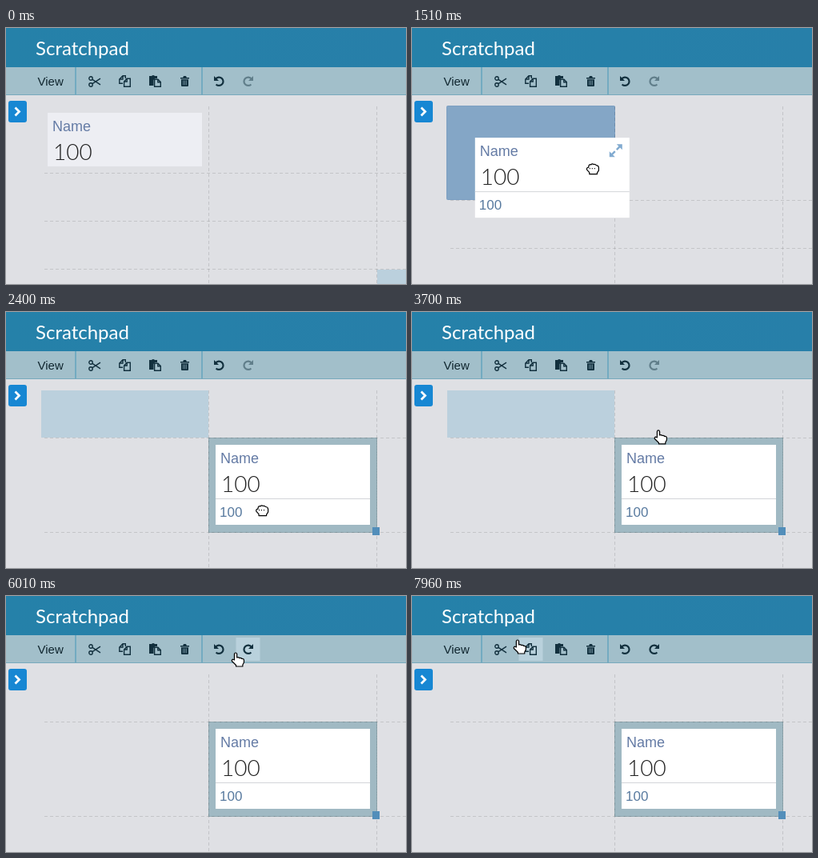
These frames come from a looping animation (500 px wide and 320 px high, 8 s). An HTML page:

```html
<!DOCTYPE html>
<html lang="en">
<head>
<meta charset="utf-8">
<title>Scratchpad</title>
<style>
html, body { margin: 0; width: 100%; height: 100%; overflow: hidden; background: #dfe0e4; }
svg { display: block; width: 500px; height: 320px; }
text { font-family: "Liberation Sans", Arial, sans-serif; }
.lato { font-family: Lato, sans-serif; }
.line { stroke: #000; stroke-opacity: .12; stroke-dasharray: 4 3; fill: none; }
.icon { fill: #12303e; stroke: none; }
.icon .o { fill: none; stroke: #12303e; stroke-width: 1.4; }
.icon .arc { fill: none; stroke: #12303e; stroke-width: 2.2; }
.cur { fill: #fff; stroke: #000; stroke-width: 1.2; stroke-linejoin: round; }
</style>
</head>
<body>
<svg viewBox="0 0 500 320">
  <defs>
    <linearGradient id="head"><stop stop-color="#2581a9"/><stop offset="1" stop-color="#277fa9"/></linearGradient>
    <g id="expand" fill="#82abd0" stroke="#82abd0">
      <path stroke="none" d="M9 0H16V7L13.5 4.5 11.5 2.5ZM0 9V16H7L4.5 13.5 2.5 11.5Z"/>
      <path stroke-width="2.4" d="M9 7 14 2M7 9 2 14"/>
    </g>
    <path id="hand" class="cur" d="M-1.6 9V1.5Q-1.4 0 0 0 1.4 0 1.6 1.5V6Q3.8 5 4.6 6.6 6.8 5.8 7.6 7.4 10 7 10.4 8.8V12L8.8 15V17H.5V15.5L-4.6 10.5Q-5.2 8.6-3.4 8.2Z"/>
    <g id="fist" class="cur">
      <path d="M-5-3Q-4.6-6-2-5.3-.6-7 1.4-5.6 3.4-6.4 4.4-4.6 7.4-4.6 7.6-1.6V2L5.6 5V6.5H-4V4.5L-7.2 1Q-8-1.6-5-2Z"/>
      <path fill="none" stroke-dasharray="1 2" d="M-4-.5H5"/>
    </g>
    <path id="arrow" class="cur" d="M0 0V16L3.8 12.6 6.4 18.2 9 17 6.5 11.5H11.6Z"/>
  </defs>
  <rect width="500" height="320" fill="#dfe0e4"/>
  <rect width="500" height="49" fill="url(#head)"/>
  <text class="lato" x="37" y="34" font-size="24" fill="#fff">Scratchpad</text>
  <rect y="49" width="500" height="35" fill="#a2bfca"/>
  <path d="M0 83.5H500" stroke="#77a9bd"/>
  <path d="M87 49V83M245 49V83" stroke="#6ba7c0" stroke-width="1.7"/>
  <text x="39.5" y="72" font-size="15" fill="#10262f">View</text>
  <rect id="lit" y="52" width="30" height="29" fill="#b9d1dc"/>
  <g class="icon">
    <g transform="translate(103 60)">
      <circle class="o" cx="3" cy="3" r="2.2"/><circle class="o" cx="3" cy="11" r="2.2"/>
      <path class="o" d="M5 4.3 15 10.8M5 9.7 15 3.2"/>
    </g>
    <path class="o" transform="translate(141 59)" d="M5 10.3H.8V5L5 .8H8.3V4M1 5H5V1M6.6 14.2V8L10 4.2H14.3V14.2ZM6.8 8H10.2V4.4"/>
    <g transform="translate(179 59)">
      <path d="M0 1H3Q5 -1 7 1H10V4H7.5L5.5 6V13H0Z"/>
      <path class="o" d="M6.6 5.2H11L14.3 8.6V14.2H6.6ZM10.8 5.4V8.8H14"/>
    </g>
    <g transform="translate(218 60)">
      <path d="M0 2H3.2L4 0H7L7.8 2H11V3.6H0ZM1 4.2H10V12Q10 13 9 13H2Q1 13 1 12Z"/>
      <path d="M3.6 5.6V11.3M5.5 5.6V11.3M7.4 5.6V11.3" stroke="#7d9dab" stroke-width=".8"/>
    </g>
    <g id="undo">
      <path class="arc" d="M262.2 63.6A5.2 5.2 0 1 1 262.6 70.4"/>
      <path d="M260 60V66H266Z"/>
    </g>
    <use id="redo" href="#undo" transform="translate(569 0) scale(-1 1)"/>
  </g>
  <rect x="3" y="91" width="23" height="27" rx="3" fill="#1787d3"/>
  <path d="M11.5 99.5 16.5 104.5 11.5 109.5" fill="none" stroke="#fff" stroke-width="2.8"/>
  <g id="scene"></g>
  <use id="cursor"/>
</svg>
<script>
const $ = id => document.getElementById(id);
const LOOP = 8000, PRESS = 1200, DROP = 2180, DELETE = 4460, UNDO = 5770;
const cols = [44, 254, 464, 674];
const buttons = [110.5, 148.5, 186.5, 223, 266, 302.5];

// pointer track: time, x, y, optional ease-out power
const track = [
  [0, 505, 325], [130, 505, 325], [730, 187, 141, 1.4],
  [1350, 187, 141], [1790, 293, 237], [2140, 322, 262, 1.5],
  [2180, 322, 262], [2960, 315, 213], [3000, 314, 211], [3700, 308, 148], [3820, 306, 143],
  [4240, 224, 68, 1.4], [4920, 224, 68], [5040, 241, 65], [5640, 264, 68, 1.3],
  [5850, 264, 68], [6010, 287, 71], [6350, 302, 68, 1.4],
  [6490, 302, 68], [7260, 188, 66], [7300, 187, 66], [7590, 150, 62, 1.4],
  [7840, 150, 62], [7960, 132, 55], [8000, 130, 54]
];

function pointer(t) {
  const i = track.findIndex(k => k[0] > t);
  const [t0, x0, y0] = track[i - 1], [t1, x1, y1, p = 1] = track[i];
  const k = 1 - (1 - (t - t0) / (t1 - t0)) ** p;
  return [x0 + (x1 - x0) * k, y0 + (y1 - y0) * k];
}

function rowEdges(t) {
  if (t < PRESS) return [98, 181, 241, 301, 361];
  if (t < DROP) return [98, 215, 275, 335];
  if (t >= DELETE && t < UNDO) return [98, 157, 217, 277, 337];
  return [98, 157, 275, 335];
}

const rect = (x, y, w, h, fill, more = '') =>
  `<rect x="${x}" y="${y}" width="${w}" height="${h}" fill="${fill}" ${more}/>`;

function card(x, y, open, icon) {
  return `<g transform="translate(${x} ${y})">` +
    rect(0, 0, 193, open ? 100 : 67, open ? '#fff' : '#edeef3') +
    '<text x="6" y="23" font-size="18" fill="#647ba5">Name</text>' +
    '<text class="lato" x="7" y="59" font-size="28" font-weight="300" fill="#222">100</text>' +
    (open ? '<path d="M0 67.5H193" stroke="#d3d5d8"/><text x="5" y="90" font-size="17" fill="#587a9f">100</text>' : '') +
    (icon ? '<use href="#expand" x="168" y="8"/>' : '') + '</g>';
}

function draw(t) {
  const [x, y] = pointer(t), rows = rowEdges(t);
  const dragging = t >= PRESS && t < DROP, placed = t >= DROP;
  const gone = t >= DELETE && t < UNDO;
  let col = -1, row = -1;
  if (y >= 98 && x >= 44) {
    col = cols.findIndex(c => c > x) - 1;
    row = rows.findIndex(r => r > y) - 1;
  }
  const home = placed ? 1 : 0;
  const overCard = !gone && col === home && row === home;
  // hover stays on the old cell until the pointer leaves the dropped card
  const [hc, hr] = placed && t < 3720 ? [0, 0] : [col, row];

  let s = '';
  if (hc >= 0 && !(hc === home && hr === home)) {
    const top = rows[hr] + (hr ? 1 : 0);
    s += rect(cols[hc], top, 209, rows[hr + 1] - top, dragging ? '#b7cae0' : '#bbd0dd');
  }
  if (dragging) s += rect(43.5, 97.5, 210, 117, '#84a6c6', 'rx="1" stroke="#7c9fc2"');
  else if (placed) s += rect(253, 157, 211, rows[2] - 156, '#a0b9c3');
  else if (overCard) s += rect(44, 98, 209, 83, '#b7cbde');

  const lines = rows.slice(1).map(r => `M48 ${r + .5}H500`).join('') + 'M253.5 98V320M463.5 98V320';
  s += `<path class="line" d="${lines}"/>`;
  if (placed) s += `<path class="line" d="M253.5 157.5H463.5V${rows[2] + .5}H253.5Z"/>`;

  if (dragging) s += card(52 + Math.max(0, x - 199), 106 + Math.max(0, y - 145), true, true);
  else if (!placed) s += card(52, 106, false, overCard);
  else if (!gone) s += card(262, 166, true, false) + rect(458, 269, 9, 10, '#528eba');
  $('scene').innerHTML = s;

  const hot = y > 50 && y < 83 ? buttons.find(b => Math.abs(x - b) < 16.6) : 0;
  $('lit').setAttribute('x', hot ? hot - 15 : -50);
  $('redo').setAttribute('opacity', t < UNDO ? .45 : 1);
  const shape = dragging || overCard ? 'fist' : hot || col >= 0 ? 'hand' : 'arrow';
  $('cursor').setAttribute('href', '#' + shape);
  $('cursor').setAttribute('transform', `translate(${x} ${y})`);
}

const start = performance.now();
function tick() {
  draw((performance.now() - start) % LOOP);
  requestAnimationFrame(tick);
}
tick();
</script>
</body>
</html>
```
